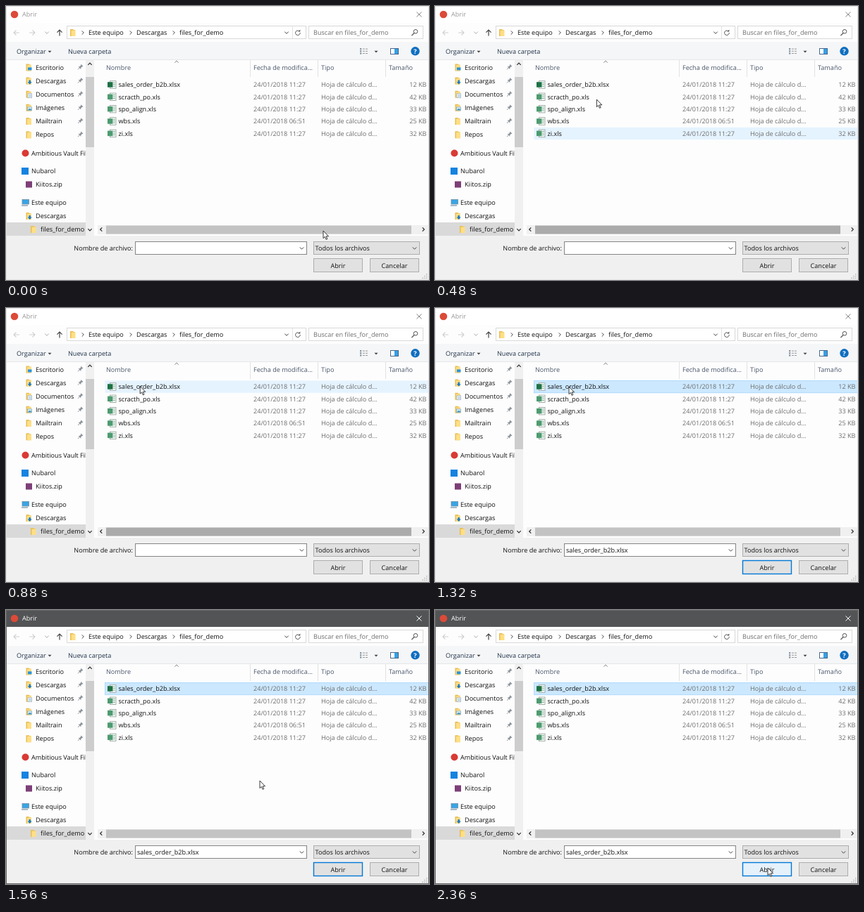
An HTML page for the animation above (2.4 s loop, 600 by 390 pixels).

```html
<!DOCTYPE html>
<html lang="es">
<head>
<meta charset="utf-8">
<title>Abrir</title>
<style>
html, body { margin: 0; width: 100%; height: 100%; overflow: hidden; background: #fff; }
svg { display: block; width: 600px; height: 390px; }
text { font: 9.1px "Open Sans", "Noto Sans", sans-serif; text-rendering: geometricPrecision; white-space: pre; }
</style>
</head>
<body>
<svg id="stage" viewBox="0 0 600 390"></svg>
<script>
const LOOP = 2400, STEP = 40, LAG = 60;
const ROW_Y = 103.4, ROW_H = 17.35;

// Markup helpers
const rect = (x, y, w, h, fill, extra = '') =>
  `<rect x="${x}" y="${y}" width="${w}" height="${h}" fill="${fill}" ${extra}/>`;
const box = (x, y, w, h, fill, stroke, id = '') =>
  rect(x + .5, y + .5, w - 1, h - 1, fill, `stroke="${stroke}" id="${id}"`);
const text = (x, y, s, fill = '#111', extra = '') =>
  `<text x="${x}" y="${y}" fill="${fill}" ${extra}>${s}</text>`;
const line = (d, stroke, w = 1, extra = '') =>
  `<path d="${d}" fill="none" stroke="${stroke}" stroke-width="${w}" ${extra}/>`;
const shape = (d, fill) => `<path d="${d}" fill="${fill}"/>`;
const dot = (x, y, r, fill) => `<circle cx="${x}" cy="${y}" r="${r}" fill="${fill}"/>`;
const down = (x, y, c = '#444', w = 1) => line(`M${x - 2.7} ${y - 1.4}l2.7 2.8 2.7-2.8`, c, w);
const up = (x, y, c = '#444', w = 1) => line(`M${x - 2.7} ${y + 1.4}l2.7-2.8 2.7 2.8`, c, w);
const side = (x, y, dir = 1, c = '#444', w = 1) =>
  line(`M${x - 1.3 * dir} ${y - 2.6}l${2.6 * dir} 2.6 ${-2.6 * dir} 2.6`, c, w);
const tri = (x, y) => shape(`M${x - 2.5} ${y - 1.2}h5l-2.5 2.8z`, '#444');

const folder = (x, y) =>
  shape(`M${x + 1} ${y - 5}h4l1 1h2v9h-7z`, '#e8bd55') +
  shape(`M${x + 2.5} ${y - 3.4}h6v8.4h-6z`, '#ffdf85');
const badges = {
  desk: (x, y) => rect(x + 3.5, y, 5.5, 4, '#2b93dc'),
  down: (x, y) => shape(`M${x + 5} ${y - 1}h2.4v2.6h1.9l-3.1 3.4-3.1-3.4h1.9z`, '#1979ca'),
  page: (x, y) => rect(x + 3.5, y - 1, 5.5, 6, '#fff', 'stroke="#8ca4b8" stroke-width=".7"') +
    line(`M${x + 5} ${y + 1}h3m-3 2h3`, '#4c94ca', .8),
  photo: (x, y) => rect(x + 3, y - 1, 6, 5, '#d5effb', 'stroke="#7a9eb0" stroke-width=".7"') +
    shape(`M${x + 3.5} ${y + 3.5}l2-2.5 1 1 1-1 1.2 2.5z`, '#3f8fb5'),
  none: () => ''
};
const icon = (kind, x, y) => folder(x, y) + badges[kind](x, y);
const sheet = (x, y, color) =>
  rect(x + 3.5, y + .5, 8.5, 10.5, '#fff', 'stroke="#8a9a90" stroke-width=".8"') +
  line(`M${x + 8} ${y + 3}h3m-3 2.5h3m-3 2.5h3`, '#6fa588', .9) +
  rect(x, y + 2, 7.5, 7.5, color);
const pin = (x, y) => `<g transform="translate(${x} ${y}) rotate(45)">` +
  shape('M-2-4.2h4v1h-.7v2.7l1.4 1.4h-5.4l1.4-1.4v-2.7h-.7z', '#8b9298') +
  line('M0 .8v3.4', '#8b9298', .9) + '</g>';

function titleBar() {
  return rect(0, 0, 600, 24, '#fff', 'id="bar"') + dot(12, 12, 5.3, '#dc4a38') +
    text(23, 15.3, 'Abrir', '#999', 'id="caption"') +
    line('M582.5 8.5l7 7m0-7l-7 7', '#888', 1, 'id="close"');
}

function navBar() {
  const arrow = (x, dir) =>
    line(`M${x - 4 * dir} 38h${8 * dir}m${-3.5 * dir}-3.5l${3.5 * dir} 3.5 ${-3.5 * dir} 3.5`, '#d0d0d0', 1.1);
  return arrow(15, -1) + arrow(37, 1) + down(58, 38, '#aaa') +
    line('M76 42.5v-8.5m-3.6 3.6l3.6-3.6 3.6 3.6', '#444', 1.2) +
    box(86, 28, 340, 19, '#fff', '#d9d9d9') + folder(90, 38) +
    side(109, 38) + text(117, 41, 'Este equipo') +
    side(177, 38) + text(185, 41, 'Descargas') +
    side(238, 38) + text(246, 41, 'files_for_demo') +
    down(398, 38) + line('M406.5 29v17', '#e2e2e2') +
    line('M415.9 35.6a3.3 3.3 0 1 0 1.3 2.4', '#555') + shape('M414.3 36.4h3v-3z', '#555') +
    box(429, 28, 163, 19, '#fff', '#d9d9d9') +
    text(436, 41, 'Buscar en files_for_demo', '#6d6d6d') +
    line('M579 38.5l-3.6 3.6', '#555', 1.3) +
    '<circle cx="581" cy="36.3" r="2.8" fill="none" stroke="#555"/>';
}

function toolBar() {
  let s = rect(0, 51, 600, 26, '#f5f6f7') + line('M0 76.5h600', '#e6e7e8') +
    text(15, 68, 'Organizar', '#22344c') + tri(62, 65) +
    text(88, 68, 'Nueva carpeta', '#22344c') + tri(525, 65);
  for (let i = 0; i < 3; i++)
    s += rect(502, 60 + i * 3.2, 2.3, 2.2, '#8795a5') +
      line(`M506 ${61.1 + i * 3.2}h3m1 0h3`, '#999');
  return s + box(545, 60, 12, 9, '#fff', '#47688c') + rect(551, 61, 5, 7, '#35a0e6') +
    dot(580.5, 64.3, 6.2, '#0f6fc0') +
    text(580.5, 67.7, '?', '#fff', 'text-anchor="middle" style="font-weight:700"');
}

function sidebar() {
  let s = rect(0, 308, 113, 19, '#d9d9d9');
  [['Escritorio', 'desk'], ['Descargas', 'down'], ['Documentos', 'page'],
   ['Imágenes', 'photo'], ['Mailtrain', 'none'], ['Repos', 'none']].forEach(([name, kind], i) => {
    const y = 87.4 + i * 19.15;
    s += icon(kind, 27.5, y) + text(42, y + 3.3, name) + pin(105, y);
  });
  s += dot(27.5, 209.5, 5, '#d93a34') + text(36, 212.7, 'Ambitious Vault File') +
    rect(22, 230, 10, 10, '#1583e0') + text(36, 238, 'Nubarol') +
    rect(28, 249.5, 9, 9, '#7d3f77') + text(42, 257.2, 'Kiitos.zip') +
    rect(23, 275.5, 9.5, 6.5, '#39a4e6', 'stroke="#6f8ea5" stroke-width=".8"') +
    line('M22 284h9', '#6f8ea5', 1.2) + text(36, 283, 'Este equipo') +
    icon('down', 27.5, 299) + text(42, 302.2, 'Descargas') +
    folder(34, 318) + text(49, 321.4, 'files_for_demo');
  return s + rect(113, 77, 12, 250, '#f0f0f0') + rect(113, 101, 12, 100, '#cdcdcd') +
    up(119, 82.5, '#333', 1.3) + down(119, 318.5, '#333', 1.3);
}

function fileList() {
  let s = '';
  [346.5, 442.5, 538.5].forEach(x => s += line(`M${x} 77v24`, '#e2e2e2'));
  [[142, 'Nombre'], [351, 'Fecha de modifica...'], [447, 'Tipo'], [543, 'Tamaño']]
    .forEach(([x, name]) => s += text(x, 91, name, '#4a5668'));
  s += up(242, 79.3, '#888') + rect(140.5, ROW_Y, 460, ROW_H, '#e5f3ff', 'id="row"');
  [['sales_order_b2b.xlsx', 12], ['scracth_po.xls', 42], ['spo_align.xls', 33],
   ['wbs.xls', 25], ['zi.xls', 32]].forEach(([name, size], i) => {
    const y = 115.2 + i * ROW_H, date = `24/01/2018 ${i == 3 ? '06:51' : '11:27'}`;
    s += sheet(144, y - 9, i ? '#4d9b70' : '#1e7145') + text(159.5, y, name) +
      text(351, y, date, '#6d6d6d') + text(447, y, 'Hoja de cálculo d...', '#6d6d6d') +
      text(596.5, y, size + ' KB', '#6d6d6d', 'text-anchor="end"');
  });
  return s + rect(130, 312, 470, 13, '#f0f0f0') + rect(142, 312.5, 433, 12, '#c3c3c3', 'id="thumb"') +
    side(135, 318, -1, '#333', 1.3) + side(592, 318, 1, '#333', 1.3);
}

function footer() {
  let s = rect(0, 327, 600, 63, '#f0f0f0') +
    text(180, 348, 'Nombre de archivo:', '#111', 'text-anchor="end"') +
    box(183, 335, 244, 19, '#fff', '#858585') + down(419.5, 344.8) +
    text(186, 348, 'sales_order_b2b.xlsx', '#111', 'id="file"') +
    box(436, 335, 151, 19, '#e1e1e1', '#adadad') + text(438.5, 348, 'Todos los archivos') + down(579.5, 344.8) +
    box(436, 359, 70, 20, '#e1e1e1', '#adadad', 'open') + text(471, 372.7, 'Abrir', '#111', 'text-anchor="middle"') +
    box(516, 359, 70, 20, '#e1e1e1', '#adadad') + text(551, 372.7, 'Cancelar', '#111', 'text-anchor="middle"');
  for (let i = 0; i < 3; i++)
    for (let j = 0; j <= i; j++) s += rect(596 - j * 2.8, 381 + i * 2.8, 1.4, 1.4, '#b5b5b5');
  return s;
}

const stage = document.getElementById('stage');
stage.innerHTML = rect(0, 0, 600, 390, '#fdfdfe') + titleBar() + navBar() + toolBar() +
  sidebar() + fileList() + footer() + box(0, 0, 600, 390, 'none', '#e4e4e4', 'frame') +
  '<path id="cursor" d="M0 0V10.6l2.4-2.2 1.7 3.9 1.7-.7-1.7-3.8h3.4z" fill="#fff" stroke="#222" stroke-width=".9"/>';
const $ = id => document.getElementById(id);
const set = (id, attrs) => { for (const k in attrs) $(id).setAttribute(k, attrs[k]); };

// Pointer path: time, x, y
const path = [[0, 450, 320], [240, 425, 292], [560, 195, 107], [960, 190, 112],
  [1320, 190, 112], [1560, 360, 243], [1960, 480, 387], [2360, 472, 367]];

// Monotone cubic interpolation along one axis
function along(t, axis) {
  const last = path.length - 1;
  if (t <= 0) return path[0][axis];
  if (t >= path[last][0]) return path[last][axis];
  const i = path.findIndex(p => p[0] > t) - 1;
  const slope = k => (path[k + 1][axis] - path[k][axis]) / (path[k + 1][0] - path[k][0]);
  const tangent = k => {
    if (k == 0 || k == last) return 0;
    const a = slope(k - 1), b = slope(k);
    return a * b > 0 ? 2 * a * b / (a + b) : 0;
  };
  const a = path[i], b = path[i + 1], h = b[0] - a[0], u = (t - a[0]) / h, v = 1 - u;
  return a[axis] * v * v * (1 + 2 * u) + b[axis] * u * u * (3 - 2 * u) +
    h * u * v * (v * tangent(i) - u * tangent(i + 1));
}

function draw(t) {
  const x = along(t - LAG, 1), y = along(t - LAG, 2);
  const active = t >= 1360, picked = t >= 960, named = t >= 1320;
  set('cursor', { transform: `translate(${along(t, 1)} ${along(t, 2)})` });

  const over = Math.floor((y - ROW_Y) / ROW_H), hover = over >= 0 && over < 5;
  set('row', {
    y: ROW_Y + (picked ? 0 : over * ROW_H),
    fill: picked ? '#cce8ff' : '#e5f3ff',
    stroke: picked ? '#a5d6fb' : 'none',
    'stroke-width': .8,
    visibility: picked || hover ? 'visible' : 'hidden'
  });

  const grey = named ? 195 : Math.round(195 - 24 * Math.min(1, t / 160));
  set('thumb', { fill: `rgb(${grey},${grey},${grey})` });

  const press = named && x > 436 && x < 506 && y > 359 && y < 380;
  set('open', {
    fill: press ? '#e5f1fb' : '#e1e1e1',
    stroke: named ? '#0078d7' : '#adadad',
    'stroke-width': named ? 1.4 : 1
  });
  set('file', { visibility: named ? 'visible' : 'hidden' });
  set('bar', { fill: active ? '#525456' : '#fff' });
  set('caption', { fill: active ? '#fff' : '#999' });
  set('close', { stroke: active ? '#fff' : '#888' });
  set('frame', { stroke: active ? '#666' : '#e4e4e4' });
}

const start = performance.now();
function tick() {
  const t = (performance.now() - start) % LOOP;
  draw(Math.floor(t / STEP) * STEP);
  requestAnimationFrame(tick);
}
tick();
</script>
</body>
</html>
```
